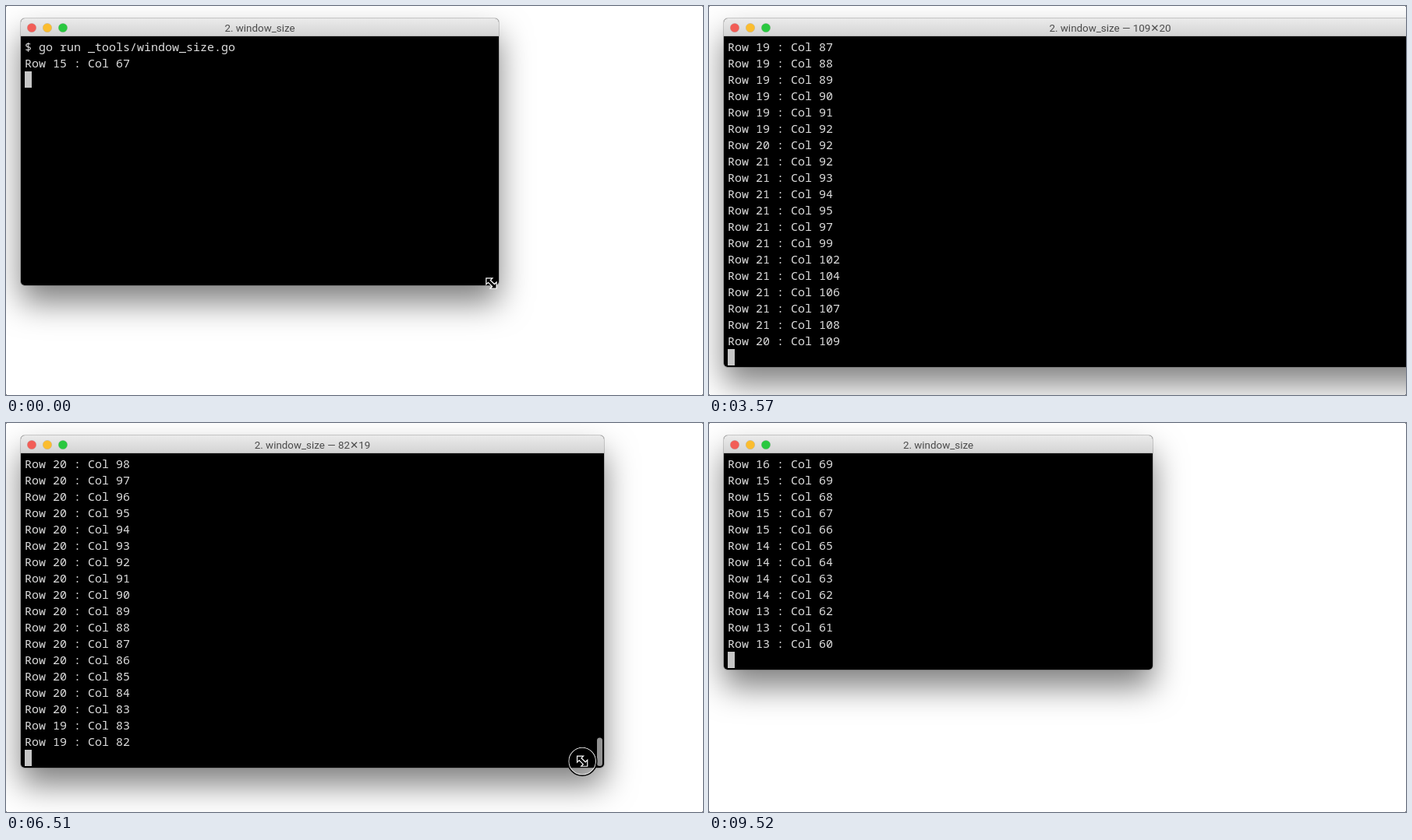
An HTML page with a canvas for the animation above (9.8 s loop, 894 by 500 pixels).

```html
<!DOCTYPE html>
<html lang="en">
<head>
<meta charset="utf-8">
<title>Terminal resize</title>
<style>
  html, body { margin: 0; width: 100%; height: 100%; overflow: hidden; background: #fff; }
  canvas { display: block; }
</style>
</head>
<body>
<canvas id="stage" width="894" height="500"></canvas>
<script>
const ctx = document.getElementById('stage').getContext('2d');
const LOOP = 9800, STEP = 70, SAMPLE = 35;
const LEFT = 19, TOP = 16, BAR = 23, CELL_W = 9, CELL_H = 21;
const PRESS = 980, RELEASE = 8190, POINTER_GONE = 8540, BAR_GONE = 8960, TITLE_RESET = 9100;

// Where the window corner is dragged to, measured in character cells.
const drag = [
  { t: 980, cols: 67.5, rows: 15.4 },
  { t: 1470, cols: 77.05, rows: 17.3 },
  { t: 1540, cols: 82.98, rows: 18.4 },
  { t: 2730, cols: 92.01, rows: 19.9 },
  { t: 3080, cols: 92.01, rows: 19.9 },
  { t: 3150, cols: 92.9, rows: 21.9 },
  { t: 3535, cols: 109.1, rows: 20.99 },
  { t: 3885, cols: 109.1, rows: 20.99 },
  { t: 3990, cols: 116.5, rows: 19.9 },
  { t: 4480, cols: 114.98, rows: 19.9 },
  { t: 5670, cols: 90.98, rows: 20.9 },
  { t: 6370, cols: 83.6, rows: 20.02 },
  { t: 7000, cols: 71.5, rows: 16.57 },
  { t: 7980, cols: 60.3, rows: 13.39 }
];

const history = ['Row 19 : Col 80', '^C$ clear', '$ go run _tools/window_size.go'];

const clamp = v => Math.min(1, Math.max(0, v));
const ease = u => u * u * (3 - 2 * u);

function cornerAt(t) {
  const i = Math.max(1, drag.findIndex(key => key.t > t));
  const [a, b] = t >= drag.at(-1).t ? drag.slice(-2) : drag.slice(i - 1, i + 1);
  const u = ease(clamp((t - a.t) / (b.t - a.t)));
  return { cols: a.cols + (b.cols - a.cols) * u, rows: a.rows + (b.rows - a.rows) * u };
}

function sizeAt(t) {
  const { cols, rows } = cornerAt(t);
  return { cols: Math.floor(cols), rows: Math.floor(rows) };
}

// The program prints a line whenever a sampled size differs from the last one.
const output = [];
for (let t = 0; t < LOOP; t += SAMPLE) {
  const { rows, cols } = sizeAt(t);
  const text = `Row ${rows} : Col ${cols}`;
  if (!output.length || output.at(-1).text !== text) output.push({ t: t && t + SAMPLE, text });
}

function roundRect(x, y, w, h, r) {
  ctx.beginPath();
  ctx.roundRect(x, y, w, h, r);
}

function ring(x, y, r, width, color) {
  ctx.beginPath();
  ctx.arc(x, y, r, 0, Math.PI * 2);
  ctx.lineWidth = width;
  ctx.strokeStyle = color;
  ctx.stroke();
}

function drawWindow(w, h, title) {
  ctx.save();
  ctx.shadowColor = 'rgba(0,0,0,.5)';
  ctx.shadowBlur = 40;
  ctx.shadowOffsetY = 22;
  ctx.fillStyle = '#000';
  roundRect(LEFT, TOP, w, h, 5);
  ctx.fill();
  ctx.restore();

  const bar = ctx.createLinearGradient(0, TOP, 0, TOP + BAR);
  bar.addColorStop(0, '#ebebeb');
  bar.addColorStop(1, '#d3d3d3');
  ctx.fillStyle = bar;
  roundRect(LEFT, TOP, w, BAR, [5, 5, 0, 0]);
  ctx.fill();
  ctx.fillStyle = '#b4b4b4';
  ctx.fillRect(LEFT, TOP + BAR - 1, w, 1);
  ctx.strokeStyle = 'rgba(0,0,0,.18)';
  ctx.lineWidth = 1;
  roundRect(LEFT - .5, TOP - .5, w + 1, h + 1, 5.5);
  ctx.stroke();

  ['#f25e57', '#fbbd2f', '#2ac840'].forEach((color, i) => {
    ring(33 + i * 20, 28, 5.6, 1, 'rgba(0,0,0,.15)');
    ctx.fillStyle = color;
    ctx.fill();
  });

  ctx.font = '13.4px Roboto, "DejaVu Sans", sans-serif';
  ctx.textAlign = 'center';
  ctx.fillStyle = '#4b4b4b';
  ctx.fillText(title, LEFT + w / 2, 33);
}

function drawText(lines, rows, w, h) {
  ctx.save();
  ctx.beginPath();
  ctx.rect(LEFT, TOP + BAR, w, h - BAR);
  ctx.clip();
  ctx.font = '500 15px "Noto Sans Mono", monospace';
  ctx.textAlign = 'left';
  ctx.fillStyle = '#dedede';
  // A taller window reveals history until the output fills it.
  const first = Math.max(17, lines.length + 1) - rows;
  lines.slice(first).forEach((line, i) => ctx.fillText(line, 24, 58 + i * CELL_H));
  ctx.fillStyle = '#c7c7c7';
  ctx.fillRect(24, 42 + (lines.length - first) * CELL_H, CELL_W, CELL_H);
  ctx.restore();
}

function drawScrollbar(right, bottom, thumb, opacity) {
  ctx.globalAlpha = opacity;
  ctx.fillStyle = '#929292';
  roundRect(right - 9, bottom - 2 - thumb, 7, thumb, 3.5);
  ctx.fill();
  ctx.globalAlpha = 1;
}

const arrow = new Path2D('M-6-6H0L-2-4L4 2L6 0V6H0L2 4L-4-2L-6 0Z');

function drawPointer(t) {
  // The pointer runs ahead of the window and drops away after release.
  const { cols, rows } = cornerAt(t + STEP);
  const x = LEFT - 4 + cols * CELL_W;
  const y = 33 + rows * CELL_H + 165 * ease(clamp((t - RELEASE) / (POINTER_GONE - RELEASE)));
  if (t >= PRESS && t < RELEASE) {
    ring(x, y, 17.4, 1.2, '#e8e8e8');
    ring(x, y, 18.6, 1.6, '#000');
  }
  ctx.save();
  ctx.translate(x, y);
  ctx.lineWidth = 2.4;
  ctx.strokeStyle = '#fff';
  ctx.stroke(arrow);
  ctx.fillStyle = '#000';
  ctx.fill(arrow);
  ctx.restore();
}

function draw(t) {
  const { rows, cols } = sizeAt(t);
  const w = cols * CELL_W + 10, h = rows * CELL_H + 28;
  const showSize = t >= PRESS && t < TITLE_RESET;
  const lines = history.concat(output.filter(line => line.t <= t).map(line => line.text));

  ctx.fillStyle = '#fff';
  ctx.fillRect(0, 0, 894, 500);
  drawWindow(w, h, '2. window_size' + (showSize ? ` — ${cols}✕${rows}` : ''));
  drawText(lines, rows, w, h);

  if (t >= PRESS && t < BAR_GONE) {
    const thumb = Math.max(24, rows * (h - BAR) / (133 + lines.length));
    drawScrollbar(LEFT + w, TOP + h, thumb, clamp((BAR_GONE - t) / 210));
  }
  if (t < POINTER_GONE) drawPointer(t);

  ctx.fillStyle = '#777';
  for (const x of [0, 893]) for (const y of [0, 499]) ctx.fillRect(x, y, 1, 1);
}

function frame() {
  const t = performance.now() % LOOP;
  draw(Math.floor(t / STEP) * STEP);
  requestAnimationFrame(frame);
}
frame();
</script>
</body>
</html>
```
